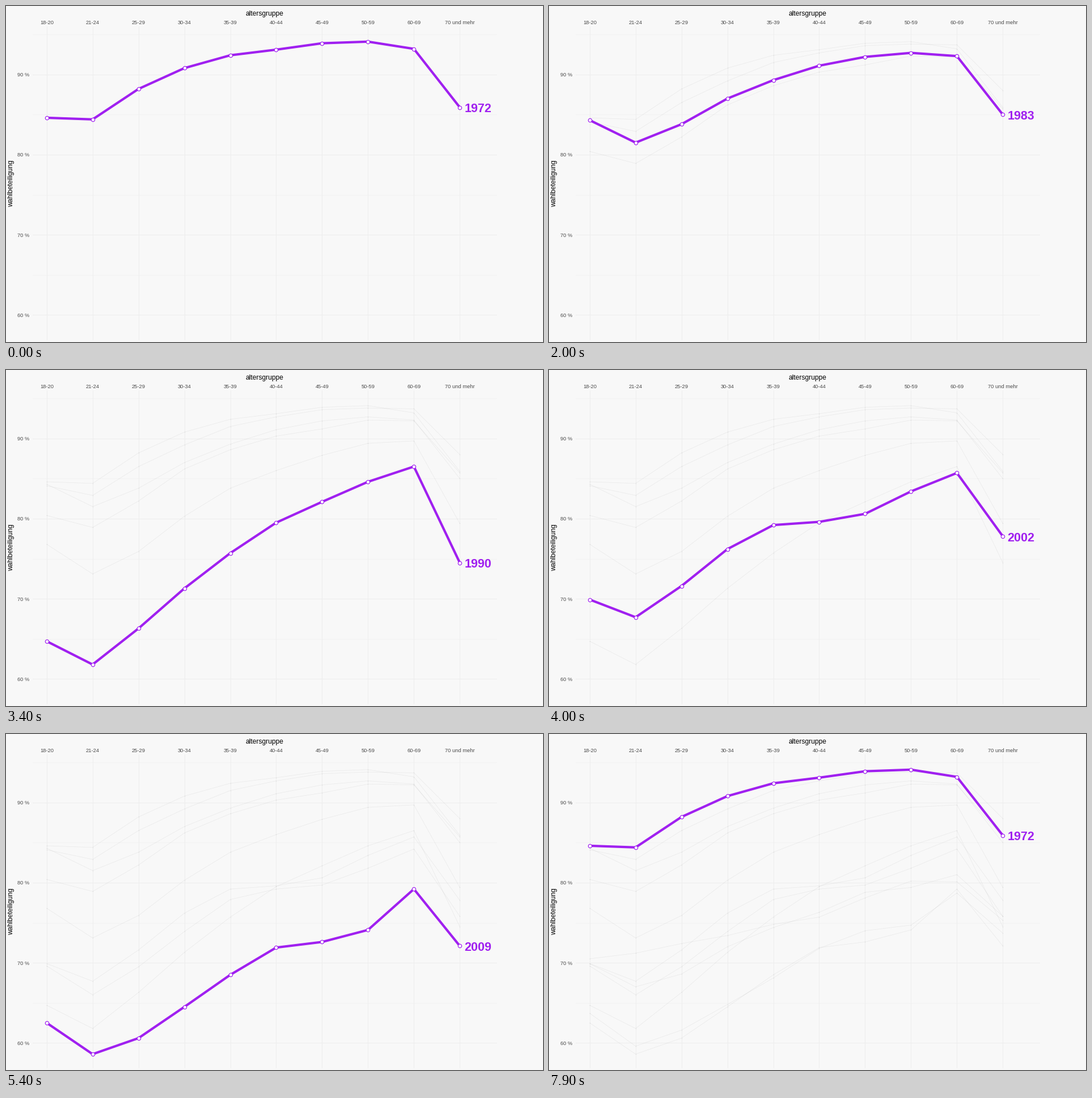
Recreate the animation shown at these times as a matplotlib script. Size 947x592 px, loop 10000 ms.

```python
import matplotlib.pyplot as plt
import numpy as np
from matplotlib.animation import FuncAnimation

W, H, DPI = 947, 592, 64
PT = 72 / DPI  # points per pixel
PURPLE = "#a020f0"
INTERVAL, LOOP = 100, 10000

AGES = ["18-20", "21-24", "25-29", "30-34", "35-39",
        "40-44", "45-49", "50-59", "60-69", "70 und mehr"]

# turnout in percent per age group
TURNOUT = {
    1972: [84.6, 84.4, 88.2, 90.8, 92.4, 93.1, 93.9, 94.1, 93.2, 85.9],
    1976: [84.1, 82.9, 86.5, 89.2, 91.5, 92.7, 93.6, 93.8, 93.7, 88.0],
    1980: [80.4, 78.9, 82.2, 86.2, 88.6, 90.3, 91.2, 92.3, 92.2, 85.7],
    1983: [84.3, 81.5, 83.8, 87.0, 89.3, 91.1, 92.2, 92.7, 92.3, 85.0],
    1987: [76.8, 73.1, 75.9, 80.3, 83.8, 86.0, 87.9, 89.4, 89.7, 79.4],
    1990: [64.7, 61.8, 66.3, 71.3, 75.7, 79.5, 82.1, 84.6, 86.5, 74.5],
    2002: [69.9, 67.7, 71.6, 76.2, 79.2, 79.6, 80.6, 83.4, 85.7, 77.8],
    2005: [69.6, 66.0, 69.5, 73.9, 77.9, 79.2, 79.7, 81.8, 84.2, 75.8],
    2009: [62.5, 58.6, 60.6, 64.5, 68.5, 71.9, 72.6, 74.1, 79.2, 72.1],
    2013: [63.7, 59.6, 61.6, 64.8, 68.1, 71.8, 74.0, 74.7, 78.7, 73.7],
    2017: [69.9, 67.0, 68.6, 72.0, 74.4, 76.3, 78.8, 79.4, 81.0, 75.8],
    2021: [70.5, 71.2, 72.4, 73.4, 74.8, 75.7, 78.1, 80.2, 80.1, 75.3],
}
YEARS = list(TURNOUT)
STARTS = [0, 600, 1300, 2000, 2700, 3400, 4000, 4700,
          5400, 6100, 6700, 7300, 7900]

xs = 71.8 + 80.94 * np.arange(len(AGES))


def y_px(percent):
    return 120.7 + 14.12 * (90 - np.asarray(percent))


plt.rcParams["font.family"] = "Liberation Sans"
fig = plt.figure(figsize=(W / DPI, H / DPI), dpi=DPI, facecolor="#f8f8f8")
ax = fig.add_axes([0, 0, 1, 1])
ax.set(xlim=(0, W), ylim=(H, 0))
ax.axis("off")


def write(x, y, text, size, color, ha="center", **style):
    return ax.text(x, y, text, fontsize=size * PT, color=color, ha=ha,
                   va="center_baseline" if "rotation" not in style else "center",
                   **style)


def grid_line(x, y, width):
    ax.plot(x, y, color="#ededed", lw=width * PT, zorder=1)


for x, age in zip(xs, AGES):
    grid_line([x, x], [36, 588], 1)
    write(x, 28.2, age, 9.4, "#4d4d4d")
for percent in range(60, 100, 5):
    major = percent % 10 == 0
    y = y_px(percent)
    grid_line([47, 865], [y, y], 1 if major else 0.5)
    if major:
        write(41, y, f"{percent} %", 9.2, "#4d4d4d", ha="right")

write(456, 12.5, "altersgruppe", 12, "black")
write(9, 313, "wahlbeteiligung", 12, "black", rotation=90)

trails = [ax.plot(xs, y_px(TURNOUT[year]), color="black", alpha=0.055,
                  lw=0.8 * PT, marker="o", ms=1.4 * PT, mew=0, zorder=2)[0]
          for year in YEARS]
curve, = ax.plot([], [], color=PURPLE, lw=4.2 * PT, marker="o", ms=6.3 * PT,
                 mfc="white", mec=PURPLE, mew=1.2 * PT, zorder=3,
                 solid_joinstyle="round", solid_capstyle="butt")
label = write(808.5, 0, "", 21.5, PURPLE, ha="left", weight="bold", zorder=4)


def update(frame):
    step = int(np.searchsorted(STARTS, frame * INTERVAL, side="right")) - 1
    year = YEARS[step % len(YEARS)]
    ys = y_px(TURNOUT[year])
    for i, trail in enumerate(trails):
        trail.set_visible(i < step)
    curve.set_data(xs, ys)
    label.set_text(str(year))
    label.set_y(ys[-1] + 0.8)
    return [*trails, curve, label]


anim = FuncAnimation(fig, update, frames=LOOP // INTERVAL, interval=INTERVAL,
                     init_func=lambda: update(0), repeat=True, repeat_delay=0)
plt.show()
```
